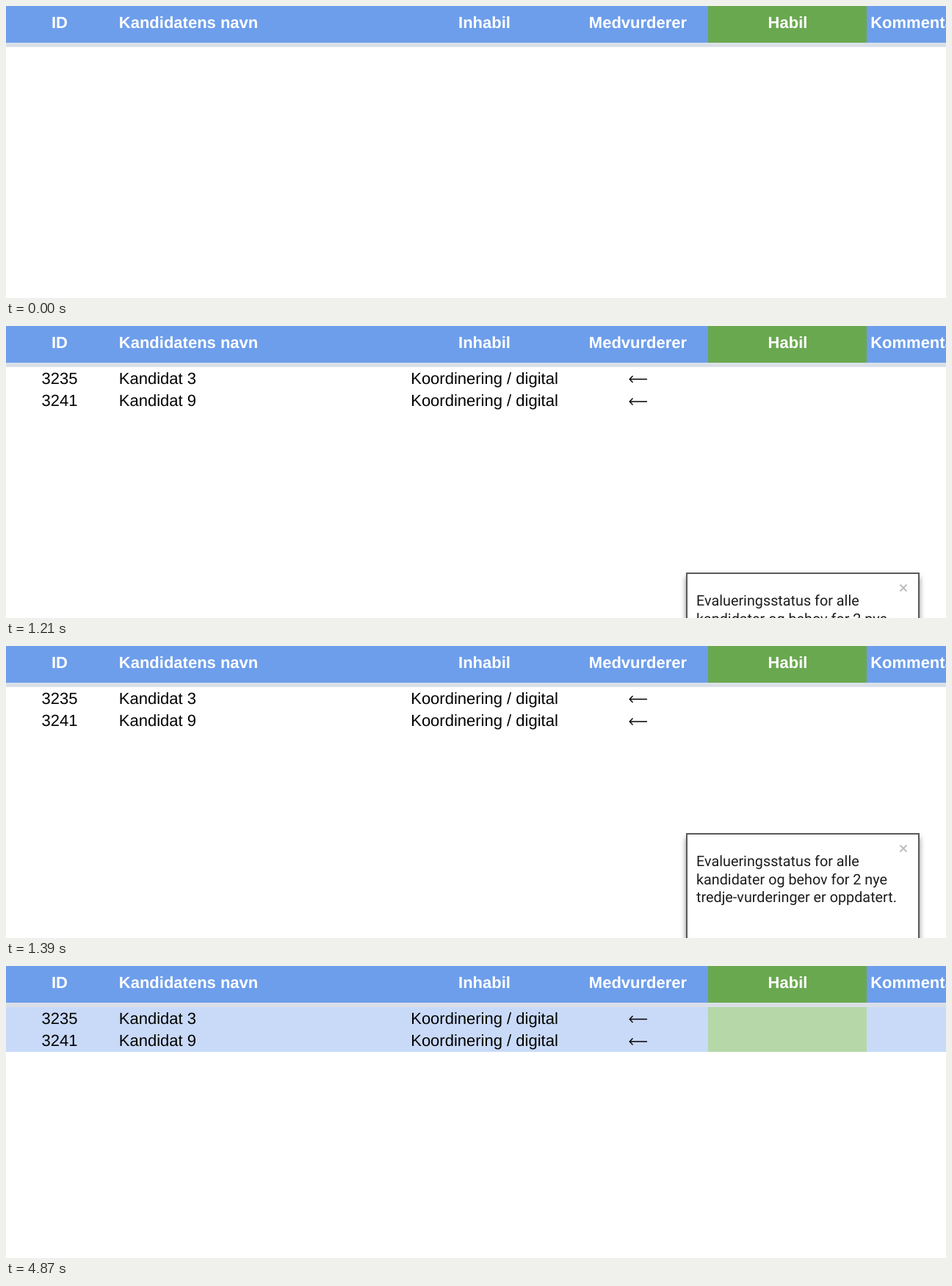
An HTML page for the animation above (5.33 s loop, 1280 px wide and 398 px high).

```html
<!DOCTYPE html>
<html lang="no">
<head>
<meta charset="utf-8">
<title>Kandidater</title>
<style>
  html, body { margin: 0; width: 100%; height: 100%; overflow: hidden; background: #fff; }
  .stage { position: relative; width: 1280px; height: 398px; overflow: hidden; }
  svg { position: absolute; inset: 0; display: block; text-rendering: geometricPrecision; }
  .table { font: 22px "Liberation Sans", Arial, sans-serif; }
  .head { font-weight: bold; fill: #fff; }
  .mid { text-anchor: middle; }
  .arrow { fill: none; stroke: #000; stroke-width: 1.4; }

  .rows, .fill, .toast { animation: 5330ms step-end infinite; }
  .rows { animation-name: rows; }
  .fill { animation-name: fill; }
  .toast { animation-name: rise; }

  .toast {
    position: absolute; left: 926px; top: 251px; width: 314px; height: 240px;
    border: 2px solid #595959; background: #fff;
    box-shadow: 0 6px 7px rgba(0, 0, 0, .48);
  }
  .toast svg { overflow: visible; font: 19.8px Roboto, sans-serif; fill: #1c1c1c; }
  .close { stroke: #bdbdbd; stroke-width: 2; }

  @keyframes rows {
    0% { visibility: hidden; }
    8.63%, 100% { visibility: visible; }
  }
  @keyframes fill {
    0% { visibility: hidden; }
    29.455%, 100% { visibility: visible; }
  }
  /* Linear rise of about 0.45 px/ms, sampled in steps */
  @keyframes rise {
    0% { transform: translateY(170px); }
    20.825% { transform: translateY(130px); }
    21.763% { transform: translateY(107px); }
    22.701% { transform: translateY(85px); }
    23.639% { transform: translateY(62px); }
    24.202% { transform: translateY(49px); }
    25.14% { transform: translateY(26px); }
    26.078% { transform: translateY(4px); }
    27.016% { transform: none; }
    91.369%, 100% { transform: translateY(170px); }
  }
</style>
</head>
<body>
<div class="stage">
  <svg class="table" width="1280" height="398">
    <defs>
      <path id="arrow" class="arrow" d="M873 0H849.5M853.5 -4.5L849.2 0L853.5 4.5"/>
    </defs>

    <rect width="1280" height="50" fill="#6d9eeb"/>
    <rect x="956" width="216" height="50" fill="#6aa84f"/>
    <rect y="50" width="1280" height="6" fill="#dadfe8"/>
    <g class="head">
      <text class="mid" x="73" y="30">ID</text>
      <text x="153.8" y="30">Kandidatens navn</text>
      <text class="mid" x="651.5" y="30">Inhabil</text>
      <text class="mid" x="860.5" y="30">Medvurderer</text>
      <text class="mid" x="1064.5" y="30">Habil</text>
      <text x="1177.2" y="30">Kommentar</text>
    </g>

    <g class="fill">
      <rect y="56" width="1280" height="61" fill="#c9daf8"/>
      <rect x="956" y="56" width="216" height="61" fill="#b6d7a8"/>
    </g>

    <g class="rows">
      <text class="mid" x="73" y="79">3235</text>
      <text x="153.8" y="79">Kandidat 3</text>
      <text class="mid" x="651.5" y="79">Koordinering / digital</text>
      <use href="#arrow" y="72.5"/>
      <text class="mid" x="73" y="109">3241</text>
      <text x="153.8" y="109">Kandidat 9</text>
      <text class="mid" x="651.5" y="109">Koordinering / digital</text>
      <use href="#arrow" y="103"/>
    </g>
  </svg>

  <div class="toast">
    <svg width="314" height="240">
      <path class="close" d="M289.5 14.5l9 9m0 -9l-9 9"/>
      <text x="12" y="43">Evalueringsstatus for alle</text>
      <text x="12" y="67.5">kandidater og behov for 2 nye</text>
      <text x="12" y="92">tredje-vurderinger er oppdatert.</text>
    </svg>
  </div>
</div>
</body>
</html>
```
